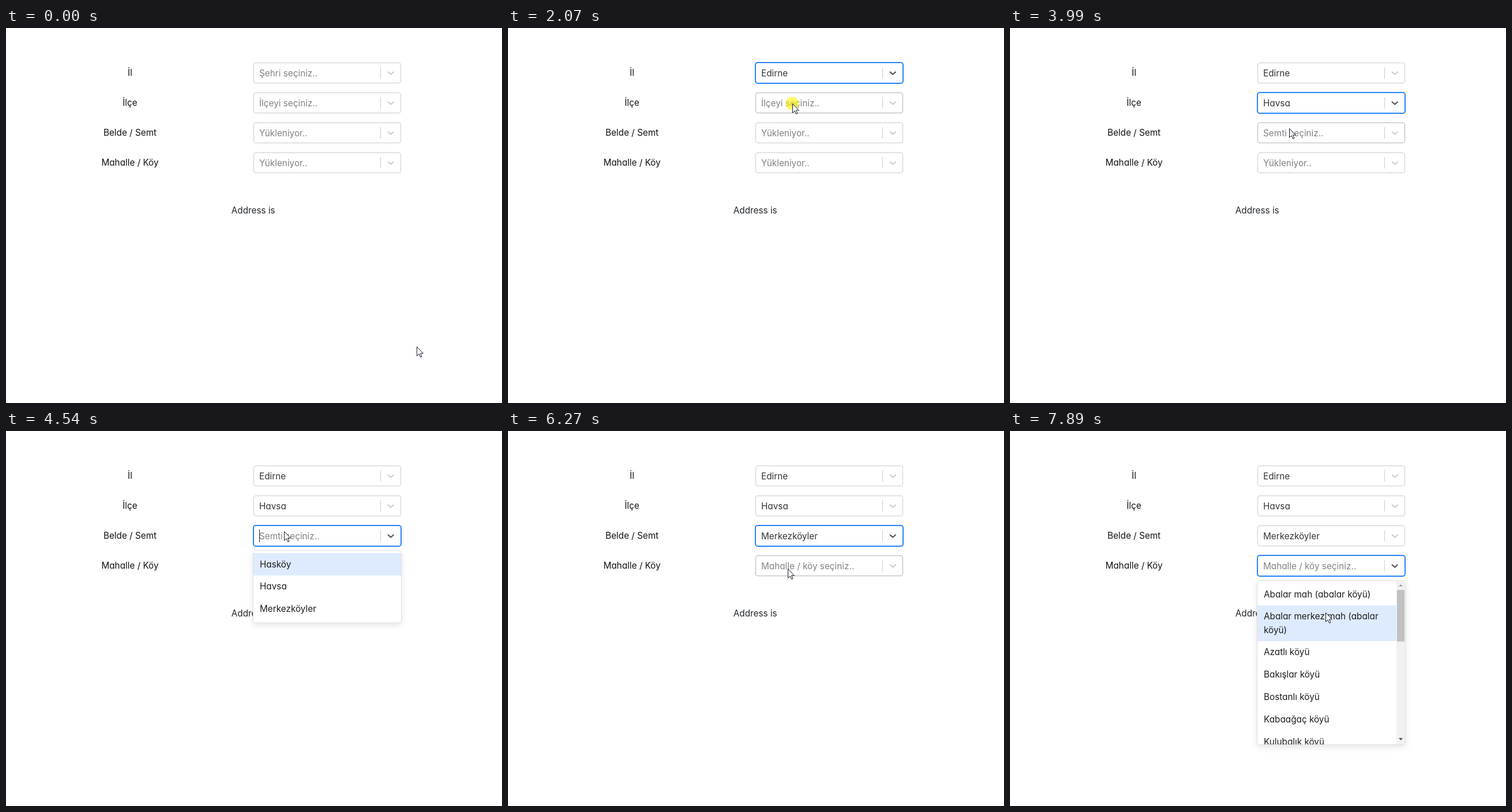
An HTML page for the animation above (8000 ms loop, 860x651 px).

```html
<!DOCTYPE html>
<html lang="tr">
<head>
<meta charset="utf-8">
<style>
  html, body { margin: 0; width: 100%; height: 100%; overflow: hidden; background: #fff; }
  svg { display: block; }
  text { font: 15.3px Inter, "Open Sans", sans-serif; font-feature-settings: "cv11"; white-space: pre; }
  .shadow { filter: drop-shadow(0 4px 5.5px rgba(0, 0, 0, .1)); }
</style>
</head>
<body>
<svg id="stage" width="860" height="651" viewBox="0 0 860 651"></svg>
<script>
const LOOP = 8000, LEFT = 429, WIDTH = 256, MAX_H = 284, ROW = 38.8, LINE = 23.2, BLINK = 530;
const stage = document.getElementById('stage');
const ruler = document.createElement('canvas').getContext('2d');

const cities = ['Adana', 'Adıyaman', 'Afyonkarahisar', 'Ağrı', 'Aksaray', 'Amasya', 'Ankara', 'Antalya'];
const citiesWithE = ['Balıkesir', 'Bilecik', 'Çanakkale', 'Denizli', 'Düzce', 'Edirne', 'Erzincan', 'Erzurum'];
const districts = ['Enez', 'Havsa', 'İpsala', 'Keşan', 'Lalapaşa', 'Meriç', 'Merkez', 'Süloğlu'];
const villages = ['Abalar mah (abalar köyü)', 'Abalar merkez mah (abalar\nköyü)', 'Azatlı köyü', 'Bakışlar köyü',
  'Bostanlı köyü', 'Kabaağaç köyü', 'Kulubalık köyü'];

// Timed lists hold [start time, value]; the last one started is current.
const fields = [
  { label: 'İl', y: 60, open: 740, close: 1830, value: 'Edirne',
    hints: [[0, 'Şehri seçiniz..']],
    typed: [[1010, 'e'], [1120, 'ed'], [1230, 'edi'], [1310, 'edir'], [1380, 'edirn'], [1440, 'edirne']],
    menus: [[0, { items: cities, total: 3150 }], [1010, { items: citiesWithE, total: 1250 }], [1120, { items: ['Edirne'] }]] },
  { label: 'İlçe', y: 112, open: 2210, close: 3840, value: 'Havsa',
    hints: [[0, 'İlçeyi seçiniz..']],
    typed: [[2460, 'h'], [2610, 'ha'], [2760, 'hav']],
    menus: [[0, { items: districts, total: 357 }], [2460, { loading: 2460 }], [3460, { items: ['Havsa'] }]] },
  { label: 'Belde / Semt', y: 164, open: 4460, close: 5880, value: 'Merkezköyler',
    hints: [[0, 'Yükleniyor..'], [3840, 'Semti seçiniz..']],
    menus: [[0, { items: ['Hasköy', 'Havsa', 'Merkezköyler'] }]] },
  { label: 'Mahalle / Köy', y: 216, open: 7110, close: LOOP,
    hints: [[0, 'Yükleniyor..'], [5880, 'Mahalle / köy seçiniz..']],
    menus: [[0, { items: villages, total: 800 }]] }
];

// Pointer path: time, x, y
const path = [
  [70, 712, 553], [520, 492, 78], [1450, 492, 78], [1590, 493, 127], [1900, 493, 127], [2030, 493, 131],
  [3240, 493, 131], [3380, 492, 148], [3600, 484, 174], [4000, 484, 174], [4240, 482, 174], [4870, 482, 174],
  [5330, 482, 304], [5950, 482, 304], [6570, 488, 180], [6800, 492, 240], [6960, 491, 231],
  [7130, 491, 231], [7570, 547, 315]
];
// Mouse button: down, up
const clicks = [[670, 820], [1750, 1900], [2070, 2220], [3760, 3910], [4310, 4500], [5800, 5950], [6960, 7120]];

const current = (list = [], t) => list.filter(e => e[0] <= t).pop();
const smooth = p => p * p * (3 - 2 * p);
const rect = (x, y, w, h, fill, more = '') =>
  `<rect x="${x}" y="${y}" width="${w}" height="${h}" fill="${fill}" ${more}/>`;
const label = (x, y, s, fill, anchor = 'start') =>
  `<text x="${x}" y="${y}" fill="${fill}" text-anchor="${anchor}">${s}</text>`;

function pointerAt(t) {
  const i = path.findIndex(p => p[0] > t);
  if (i < 0) return path[path.length - 1].slice(1);
  if (i === 0) return path[0].slice(1);
  const [t0, x0, y0] = path[i - 1], [t1, x1, y1] = path[i];
  const k = smooth((t - t0) / (t1 - t0));
  return [Math.round(x0 + (x1 - x0) * k), Math.round(y0 + (y1 - y0) * k)];
}

function loadingDots(y, age) {
  let out = '';
  for (let i = 0; i < 3; i++) {
    const p = (age - i * 160) / 1000, q = p % 1;
    const alpha = p < 0 ? 1 : smooth(Math.max(0, 1 - Math.abs(q - .4) / .4));
    out += `<circle cx="${620 + i * 8}" cy="${y}" r="2" fill="#666" opacity="${alpha}"/>`;
  }
  return out;
}

function control(f, t, focused, [mx, my]) {
  const { y } = f, mid = y + 18;
  const isOpen = t >= f.open && t < f.close;
  const hover = mx >= LEFT && mx < LEFT + WIDTH && my >= y && my < y + 36;
  let out = focused
    ? rect(LEFT, y, WIDTH, 36, '#fff', 'rx="4" stroke="#2684ff" stroke-width="2"')
    : rect(LEFT + .5, y + .5, WIDTH - 1, 35, '#fff', `rx="3.5" stroke="${hover ? '#b3b3b3' : '#ccc'}"`);

  const typed = isOpen && current(f.typed, t);
  if (typed) out += label(439, y + 23, typed[1], '#333');
  else if (f.value && t >= f.close) out += label(439, y + 24, f.value, '#333');
  else out += label(439, y + 24, current(f.hints, t)[1], '#808080');

  const since = typed ? typed[0] : f.open - 60;
  if (isOpen && (t - since) % (2 * BLINK) < BLINK) {
    ruler.font = '15.3px Inter, "Open Sans", sans-serif';
    const x = typed ? Math.round(440 + ruler.measureText(typed[1]).width) : 439;
    out += rect(x, y + 7, 1, 22, '#222');
  }
  const menu = current(f.menus, t)[1];
  if (isOpen && menu.loading) out += loadingDots(mid, t - menu.loading);
  return out + rect(649, y + 8, 1, 20, '#ccc') +
    `<path d="M662.7 ${mid - 1.6}l4.5 4.2 4.5-4.2" fill="none" stroke="${focused ? '#505050' : '#ccc'}"
      stroke-width="2.1" stroke-linecap="round" stroke-linejoin="round"/>`;
}

function scrollbar(h, total) {
  const thumb = Math.max(20, (h - 32) * h / total);
  return rect(241, 0, 15, h, '#f1f1f1') + rect(242, 16, 13, thumb, '#c1c1c1') +
    `<path d="M245 10l3.5-4 3.5 4z" fill="#a3a3a3"/><path d="M245 ${h - 11}l3.5 4 3.5-4z" fill="#505050"/>`;
}

function dropdown(f, t, [mx, my], pressed) {
  const { items, total, loading } = current(f.menus, t)[1];
  const top = f.y + 44;
  let h = 47, inner = '';
  if (loading) {
    inner = label(128, 28.5, 'Yükleniyor..', '#999', 'middle');
  } else {
    let y = 4;
    const rows = items.map(s => {
      const lines = s.split('\n'), row = { lines, y, h: ROW + (lines.length - 1) * LINE };
      y += row.h;
      return row;
    });
    h = Math.min(MAX_H, y + 4);
    const under = rows.findIndex(r => my >= top + r.y && my < top + r.y + r.h);
    const active = Math.max(0, under);
    rows.forEach((r, i) => {
      if (i === active) inner += rect(0, r.y, WIDTH, r.h, pressed && under >= 0 ? '#b2d4ff' : '#deebff');
      r.lines.forEach((s, n) => inner += label(11, r.y + 24.6 + n * LINE, s, '#1c1c1c'));
    });
    if (total) inner += scrollbar(h, total);
  }
  return rect(LEFT - .5, top - .5, WIDTH + 1, h + 1, '#fff', 'rx="4" stroke="#e0e0e0" class="shadow"') +
    `<svg x="${LEFT}" y="${top}" width="${WIDTH}" height="${h}">${inner}</svg>`;
}

function draw(t) {
  const mouse = pointerAt(t), [mx, my] = mouse;
  const pressed = clicks.some(([a, b]) => t >= a && t < b);
  const focus = fields.filter(f => f.open <= t).pop();
  let out = rect(0, 0, 860, 651, '#fff');
  for (const f of fields) {
    out += label(215, f.y + 23, f.label, '#111', 'middle') + control(f, t, f === focus, mouse);
  }
  out += label(428.7, 322, 'Address is', '#212529', 'middle');
  if (focus && t < focus.close) out += dropdown(focus, t, mouse, pressed);
  if (pressed) out += `<circle cx="${mx}" cy="${my}" r="11.5" fill="#fff200" opacity=".6"/>`;
  out += `<path transform="translate(${mx} ${my})" d="M.5.5V16.2L4.2 12.8 6.7 18.4 9 17.4 6.6 11.9H11.3Z"
    fill="#fff" stroke="#15152a"/>`;
  stage.innerHTML = out;
}

function tick() {
  draw(performance.now() % LOOP);
  requestAnimationFrame(tick);
}
tick();
</script>
</body>
</html>
```
